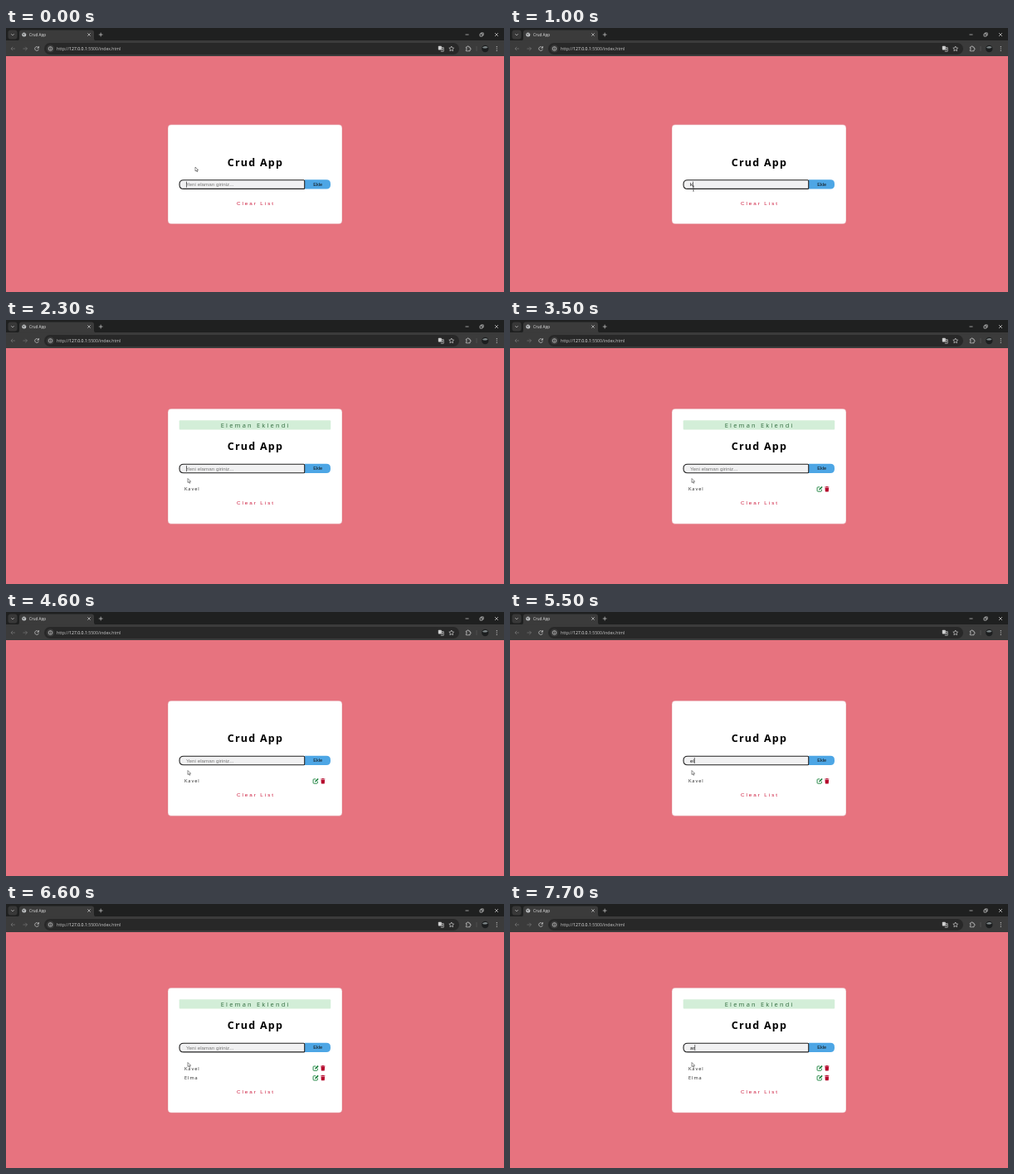
These frames come from a looping animation (600 px wide and 319 px high, 8000 ms). An HTML page:

```html
<!DOCTYPE html>
<html lang="tr">
<head>
<meta charset="utf-8">
<title>Crud App</title>
<style>
  html, body { margin: 0; width: 100%; height: 100%; overflow: hidden; background: #e7737f; }
  svg { display: block; width: 100vw; height: 100vh; }
  text { font-family: "Open Sans", sans-serif; white-space: pre; }
  .ui { font-family: "Liberation Sans", Arial, sans-serif; }
  .line { fill: none; stroke: #d0d0d0; stroke-width: .7; }
  .dim { stroke: #777; }
  .item { font-size: 5.6px; letter-spacing: .94px; fill: #222; }
</style>
</head>
<body>
<svg viewBox="0 0 600 319">
  <defs>
    <g id="icons">
      <path d="M373.2 -2.3h-2.2q-.9 0 -.9 .9v3.5q0 .9 .9 .9h3.5q.9 0 .9 -.9v-1.7" fill="none" stroke="#17803a" stroke-width=".9"/>
      <path d="M372.2 1.2l.3 -1.5l3 -3l1.2 1.2l-3 3z" fill="#17803a"/>
      <path d="M379.2 -2.7h1.5l.4 -.5h1.4l.4 .5h1.5v.8h-5.2zM379.5 -1.5h4.6l-.3 4.2q-.1 .6 -.7 .6h-2.6q-.6 0 -.7 -.6z" fill="#b5082c"/>
    </g>
  </defs>

  <!-- browser window -->
  <rect width="600" height="16" fill="#1f2020"/>
  <rect y="15" width="600" height="19" fill="#3b3b3b"/>
  <rect x="2.5" y="2.5" width="11" height="11" rx="3" fill="#383838"/>
  <path d="M13 15.5q3 0 3 -3v-7q0 -3 3 -3h84q3 0 3 3v7q0 3 3 3z" fill="#3b3b3b"/>
  <circle cx="21.8" cy="8" r="2.5" fill="#c4c7c9"/>
  <path d="M20 7l2 .7l-.6 1.7M22.4 5.8l1.4 1.5" class="line" style="stroke:#3b3b3b"/>
  <text x="28" y="9.8" font-size="4.6" fill="#e8e8e8">Crud App</text>
  <path class="line" d="M6.3 7.2l1.7 1.7l1.7 -1.7M98.3 6.3l3.4 3.4m0 -3.4l-3.4 3.4M111.8 8h4.8m-2.4 -2.4v4.8M553.5 8h4M571 7h3v3h-3zM572.3 6.9v-1h2.9v2.9h-1M589 6l4 4m0 -4l-4 4"/>
  <path class="line dim" d="M11 25h-5m2.2 -2.2l-2.2 2.2l2.2 2.2M20.5 25h5m-2.2 -2.2l2.2 2.2l-2.2 2.2"/>
  <path class="line" d="M39.3 24a2.4 2.4 0 1 0 .1 1.7M39.5 22v2.2h-2.2"/>
  <rect x="46" y="18" width="500" height="14" rx="7" fill="#282828"/>
  <circle cx="53.5" cy="25" r="4.6" fill="#3b3b3b"/>
  <circle class="line" cx="53.5" cy="25" r="2.3"/>
  <path class="line" d="M53.5 24.6v1.7M53.5 23.4v.6"/>
  <text x="61" y="26.8" font-size="5.15" fill="#c5c5c5">http://<tspan fill="#f2f2f2">127.0.0.1</tspan>:5500/index.html</text>
  <rect x="520.8" y="21.8" width="4" height="4.6" rx=".6" fill="#d0d0d0"/>
  <path class="line" d="M523.4 23.6h3.8v4.6h-3.4M524.7 25.2h1.9m-.3 0l-1.5 2"/>
  <path class="line" d="M536.7 22l.9 1.9l2 .3l-1.5 1.4l.4 2.1l-1.8 -1l-1.8 1l.4 -2.1l-1.5 -1.4l2 -.3z"/>
  <path class="line" d="M554.3 23h1.4q0 -1.2 .9 -1.2t.9 1.2h1.5v1.4q1.2 0 1.2 .9t-1.2 .9v1.6h-4.7v-1.6q1 0 1 -.9t-1 -.9z"/>
  <path d="M567 22v6" stroke="#5c5c5c" stroke-width=".6"/>
  <circle cx="577.3" cy="25" r="4.2" fill="#1c1e1f"/>
  <path d="M573.8 23.8q3 -3.5 6.9 -.6l-2 1.2h-3z" fill="#7d8587"/>
  <g fill="#d0d0d0"><circle cx="591.3" cy="22.7" r=".6"/><circle cx="591.3" cy="25" r=".6"/><circle cx="591.3" cy="27.3" r=".6"/></g>

  <!-- page -->
  <g id="card">
    <rect id="panel" x="195" width="210" rx="4" fill="#fff" stroke="#d4707b" stroke-width=".4"/>
    <g id="alert">
      <rect x="208.7" y="14" width="182.5" height="11.3" rx="1" fill="#d3eed8"/>
      <text x="258.7" y="22.4" font-size="7.5" letter-spacing="2.19" fill="#2f6a3d">Eleman Eklendi</text>
    </g>
    <text x="266.7" y="50.2" font-size="12.5" font-weight="700" letter-spacing="1.25" fill="#000">Crud App</text>
    <path d="M360 66.5h26q5 0 5 5v1.2q0 5 -5 5h-26z" fill="#4da6e5"/>
    <text class="ui" x="370.2" y="74" font-size="5.6" fill="#111">Ekle</text>
    <path d="M214 67h144.7q1 0 1 1v8.6q0 1 -1 1h-144.7q-5 0 -5 -5v-.6q0 -5 5 -5z" fill="#f1f1f2" stroke="#222" stroke-width="1.1"/>
    <text id="field" class="ui" x="217" y="74.4" font-size="6.25"></text>
    <rect id="caret" y="68.8" width=".6" height="7" fill="#111"/>
    <g class="row"><text class="item" x="215" y="99.3">Kavel</text><use href="#icons" y="97"/></g>
    <g class="row"><text class="item" x="215" y="111">Elma</text><use href="#icons" y="108.7"/></g>
    <text id="clear" class="ui" x="278" font-size="6.25" letter-spacing="1.95" fill="#cc1a3c">Clear List</text>
  </g>
  <path id="arrow" d="M0 0v5l1.2 -1l.8 1.8l.9 -.4l-.8 -1.7h1.6z" fill="#fff" stroke="#222" stroke-width=".5"/>
  <path id="beam" d="M-1 -3h2M0 -3v6M-1 3h2" fill="none" stroke="#333" stroke-width=".6"/>
</svg>
<script>
const LOOP = 8000, ADD1 = 2300, ADD2 = 6600, ALERT_END = 4600;
const keys = [
  [0, ''], [800, 'k'], [1100, 'ka'], [1400, 'kav'], [1600, 'kave'], [1700, 'kavel'], [ADD1, ''],
  [5300, 'e'], [5500, 'el'], [5700, 'elm'], [5900, 'elma'], [ADD2, ''], [7500, 'a'], [7700, 'ar']
];
const $ = id => document.getElementById(id);
const show = (el, on) => el.setAttribute('visibility', on ? 'visible' : 'hidden');
const place = (el, x, y) => el.setAttribute('transform', `translate(${x} ${y})`);
const rows = [...document.querySelectorAll('.row')];
const field = $('field');

function draw(t) {
  // layout grows around its centre with each list row
  const count = (t >= ADD1) + (t >= ADD2);
  const height = [120, 139.2, 151][count];
  place($('card'), 0, 176.8 - height / 2);
  $('panel').setAttribute('height', height);
  $('clear').setAttribute('y', height - 23);
  rows.forEach((row, i) => {
    show(row, i < count);
    show(row.lastChild, i < count && t >= [ADD1, ADD2 - 100][i] + 100);
  });
  show($('alert'), t >= ADD1 && t < ALERT_END || t >= ADD2);

  const [since, typed] = keys.filter(k => k[0] <= t).pop();
  field.textContent = typed || 'Yeni elaman giriniz...';
  field.setAttribute('fill', typed ? '#111' : '#777');
  $('caret').setAttribute('x', 217 + (typed ? field.getComputedTextLength() : 0));
  show($('caret'), (typed ? t - since : t) % 1000 < 500);

  const k = Math.min(1, Math.max(0, (t - 200) / 300));
  const x = 228 - 9 * k, y = 168 + 23.5 * k;
  const overField = y > 183 && count === 0;
  place($('arrow'), x, y);
  place($('beam'), x + 2, y + 2.5);
  show($('arrow'), !overField);
  show($('beam'), overField);
}

const start = performance.now();
function tick() {
  const t = (performance.now() - start) % LOOP;
  draw(Math.floor(t / 100) * 100);
  requestAnimationFrame(tick);
}
tick();
</script>
</body>
</html>
```
